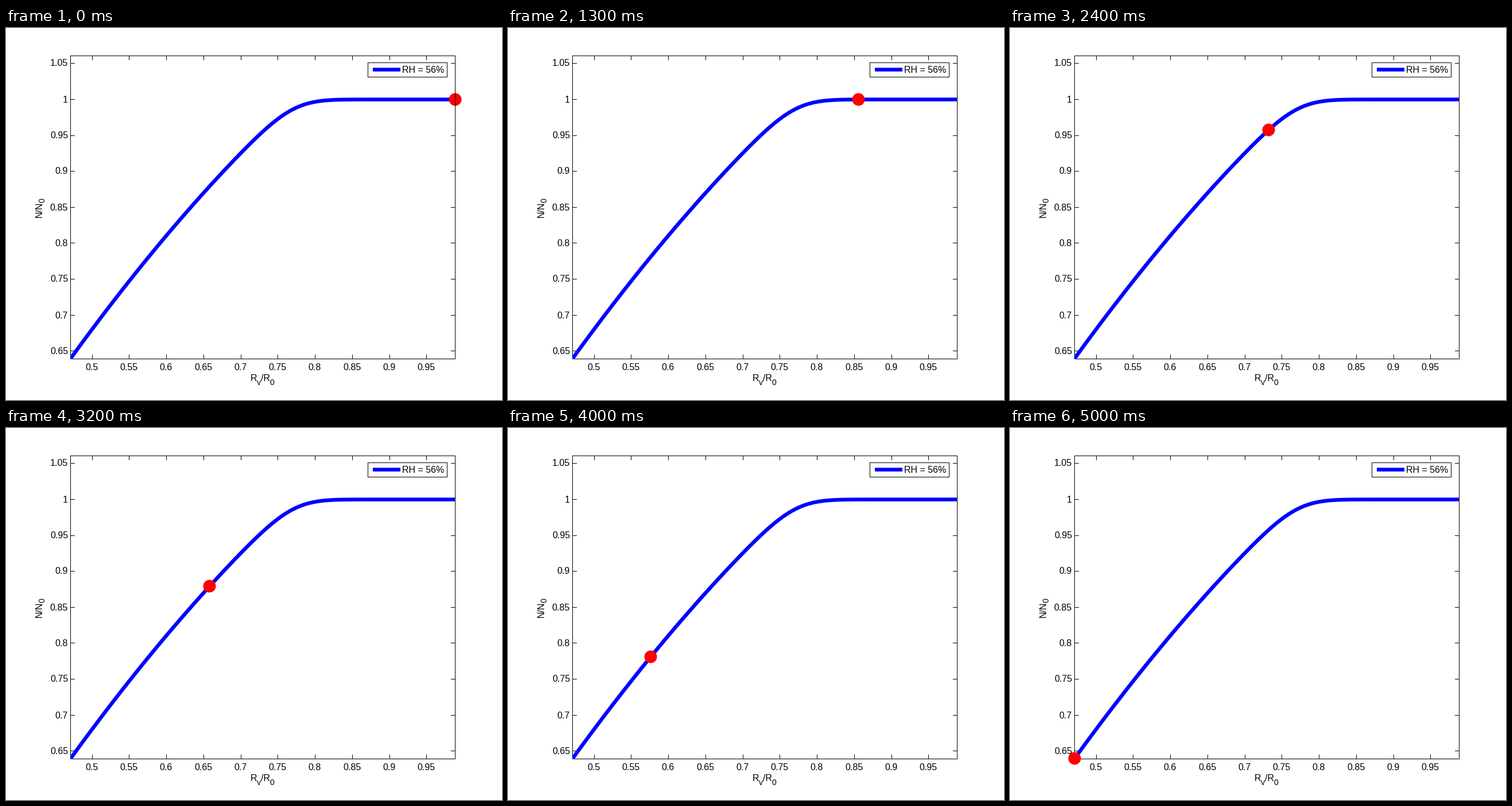
A matplotlib script that plays this animation: 864 px wide and 648 px high, repeating every 5200 ms.

```python
import math

import numpy as np
import matplotlib.pyplot as plt
from matplotlib.animation import FuncAnimation
from matplotlib.patches import Circle, Rectangle

WIDTH, HEIGHT, DPI = 864, 648, 72
# Pixel columns and rows of the axes box, with y pointing down.
LEFT, RIGHT, TOP, BOTTOM = 112, 782, 48, 576
FONT_SIZE, SUB_SIZE = 16, 14
TICK = 7
CURVE_WIDTH = 6.5
STEP_MS, STEPS = 100, 52

plt.rcParams["font.family"] = "Liberation Sans"
fig = plt.figure(figsize=(WIDTH / DPI, HEIGHT / DPI), dpi=DPI, facecolor="white")
ax = fig.add_axes([0, 0, 1, 1])
ax.set_xlim(0, WIDTH)
ax.set_ylim(HEIGHT, 0)
ax.axis("off")


def curve_y(x, knee=504.5, width=40, plateau=124.5):
    """Flat plateau that bends softly at the knee into a steepening fall."""
    z = (knee - x) / width
    share = (1 + np.vectorize(math.erf)(z / math.sqrt(2))) / 2
    drop = width * (z * share + np.exp(-z * z / 2) / math.sqrt(2 * math.pi))
    return plateau + 0.921 * drop + 0.000587 * drop ** 2


def dot_x(step):
    """Steady travel to the left that runs ahead around step 20."""
    return 783.2 - 13.685 * step - 21.5 / np.cosh((step - 19.8) / 5)


def pixel_center(value):
    return np.floor(value) + 0.5


def rule(xs, ys, zorder=2):
    """One-pixel line; whole coordinates name pixel columns and rows."""
    ax.plot(np.add(xs, 0.5), np.add(ys, 0.5), color="black", lw=1,
            zorder=zorder, antialiased=False, snap=False,
            solid_capstyle="projecting", solid_joinstyle="miter")


def frame_box(left, top, right, bottom, zorder=2):
    rule([left, right, right, left, left],
         [top, top, bottom, bottom, top], zorder)


def label(x, y, text, size=FONT_SIZE, **style):
    ax.text(x, y, text, fontsize=size, color="black", va="baseline",
            zorder=7, **style)


def draw_axes():
    frame_box(LEFT, TOP, RIGHT, BOTTOM)
    rule([RIGHT, RIGHT], [TOP, BOTTOM], zorder=5)
    for i in range(10):
        x = math.floor(150 + 64.75 * i)
        rule([x, x], [BOTTOM - TICK, BOTTOM])
        rule([x, x], [TOP, TOP + TICK])
        label(x - 0.5, 595.5, f"{0.5 + 0.05 * i:.2g}", ha="center")
    for i in range(9):
        y = math.floor(61.9 + 62.6 * i)
        rule([LEFT, LEFT + TICK], [y, y])
        rule([RIGHT - TICK, RIGHT], [y, y])
        label(108, y + 5.5, f"{1.05 - 0.05 * i:.3g}", ha="right")


def draw_axis_names():
    label(426, 615, "R")
    label(437, 622, "v", SUB_SIZE)
    label(443.8, 615, "/R")
    label(459, 622, "0", SUB_SIZE)
    upright = dict(rotation=90, rotation_mode="anchor", ha="left")
    label(63, 329.5, "N/N", **upright)
    label(68, 303.5, "0", SUB_SIZE, **upright)


def draw_legend():
    ax.add_patch(Rectangle((630, 60), 138, 25, fc="white", ec="none", zorder=5))
    frame_box(630, 60, 768, 85, zorder=6)
    ax.plot([639, 687], [72.5, 72.5], color="blue", lw=CURVE_WIDTH, zorder=6,
            solid_capstyle="butt", snap=False)
    label(690.5, 78.5, "RH = 56%")


def draw_curve():
    xs = np.linspace(LEFT, RIGHT + 1, 300)
    curve, = ax.plot(xs, curve_y(xs), color="blue", lw=CURVE_WIDTH, zorder=3,
                     solid_capstyle="projecting", snap=False)
    curve.set_clip_path(Rectangle((LEFT, TOP), RIGHT - LEFT + 1,
                                  BOTTOM - TOP + 1, transform=ax.transData))


draw_axes()
draw_axis_names()
draw_legend()
draw_curve()
dot = ax.add_patch(Circle((RIGHT, 124.5), 11, fc="red", ec="none", lw=0,
                          zorder=4))


def update(frame):
    # The dot rests one extra step at each end of its path.
    x = dot_x(np.clip(frame - 1, 0, STEPS - 3))
    dot.center = pixel_center(x), pixel_center(curve_y(x))
    return (dot,)


animation = FuncAnimation(fig, update, frames=STEPS, interval=STEP_MS,
                          repeat=True, repeat_delay=0, blit=False)
plt.show()
```
